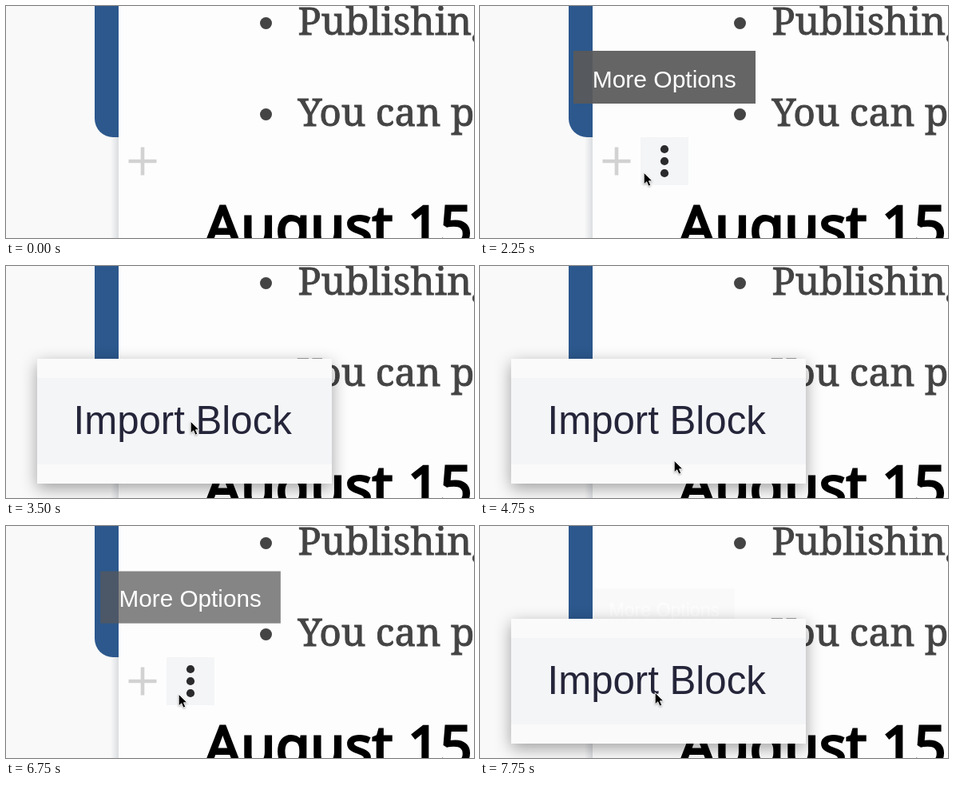
An HTML page for the animation above (8 s loop, 586 by 290 pixels).

```html
<!DOCTYPE html>
<html lang="en">
<head>
<meta charset="utf-8">
<title>Block menu</title>
<style>
  html, body { margin: 0; width: 100%; height: 100%; overflow: hidden; background: #f9f9f9; }
  svg { display: block; width: 100%; height: 100%; }

  /* Thin strokes give the in-between weights */
  .serif { font: 48px "Noto Serif", serif; fill: #444; stroke: #444; stroke-width: .9px; }
  .head { font: 70px "Noto Sans", "Open Sans", sans-serif; letter-spacing: .4px; stroke: #000; stroke-width: 3px; }
  .tip text { font: 30px "Liberation Sans", Arial, sans-serif; fill: #fff; text-anchor: middle; }
  .menu text { font: 49.2px "Liberation Sans", Arial, sans-serif; fill: #25253a; }
  .panel { fill: #fafafb; filter: drop-shadow(0 6px 10px rgba(0, 0, 0, .36)); }
  .arrow { filter: drop-shadow(0 1px .8px rgba(0, 0, 0, .3)); }

  /* Everything advances in 250 ms steps: 3.125% of the loop each */
  .cursor, .dots, .hover, .tip, .menu, .row {
    animation: 8s step-end infinite;
    transform-origin: 0 0;
  }
  .tip { transform-origin: 231px 89px; }
  .cursor { animation-name: cursor; }
  .dots { animation-name: dots; }
  .hover { animation-name: hover; }
  .tip { animation-name: tip; }
  .menu { animation-name: menu; }
  .row { animation-name: row; }

  @keyframes cursor {
    0% { opacity: 0; transform: translate(250px, 262px); }
    18.75% { opacity: 1; transform: translate(250px, 262px); }
    21.875% { opacity: 1; transform: translate(213px, 236px); }
    25% { opacity: 1; transform: translate(205px, 215px); }
    28.125% { opacity: 1; transform: translate(205px, 208px); }
    31.25% { opacity: 1; transform: translate(220px, 201px); }
    34.375% { opacity: 1; transform: translate(226px, 192px); }
    37.5% { opacity: 1; transform: translate(231px, 194px); }
    59.375% { opacity: 1; transform: translate(243px, 243px); }
    62.5% { opacity: 1; transform: translate(421px, 206px); }
    65.625% { opacity: 1; transform: translate(477px, 204px); }
    68.75% { opacity: 1; transform: translate(483px, 205px); }
    75% { opacity: 1; transform: translate(472px, 208px); }
    78.125% { opacity: 1; transform: translate(308px, 228px); }
    81.25% { opacity: 1; transform: translate(226px, 215px); }
    84.375% { opacity: 1; transform: translate(216px, 210px); }
    93.75%, 100% { opacity: 1; transform: translate(219px, 208px); }
  }
  @keyframes dots {
    0%, 43.75%, 96.875%, 100% { opacity: 0; }
    25%, 81.25% { opacity: 1; }
    40.625%, 93.75% { opacity: .7; }
  }
  @keyframes hover {
    0%, 43.75%, 96.875%, 100% { opacity: 0; }
    28.125%, 84.375% { opacity: 1; }
    40.625%, 93.75% { opacity: .4; }
  }
  @keyframes tip {
    0%, 43.75% { opacity: 0; transform: none; }
    28.125%, 87.5% { opacity: 1; transform: none; }
    40.625%, 93.75% { opacity: .88; transform: none; }
    84.375% { opacity: .79; transform: scale(.99); }
    96.875%, 100% { opacity: .02; transform: translateY(14px) scale(.77); }
  }
  @keyframes menu {
    0%, 71.875% { opacity: 0; transform: none; }
    40.625%, 93.75% { opacity: .16; transform: translate(43.5px, 58.2px) scale(.833, .705); }
    43.75%, 96.875%, 100% { opacity: 1; transform: none; }
    68.75% { opacity: .15; transform: none; }
  }
  @keyframes row {
    0%, 62.5% { opacity: 0; }
    43.75%, 96.875%, 100% { opacity: 1; }
  }
</style>
</head>
<body>
<svg viewBox="0 0 586 290">
  <defs>
    <linearGradient id="edge">
      <stop offset="0" stop-color="#dadde1" stop-opacity="0"/>
      <stop offset="1" stop-color="#dadde1"/>
    </linearGradient>
  </defs>

  <rect width="586" height="290" fill="#f9f9f9"/>
  <rect x="131" width="10" height="290" fill="url(#edge)"/>
  <path d="M111 0H141V164H134A23 23 0 0 1 111 141Z" fill="#2c588d"/>
  <rect x="141" width="445" height="290" fill="#fdfdfd"/>

  <g fill="#444">
    <circle cx="325.5" cy="21.5" r="7.5"/>
    <circle cx="325.5" cy="135.5" r="7.5"/>
  </g>
  <text class="serif" x="365.5" y="36">Publishing</text>
  <text class="serif" x="365.5" y="150">You can publish</text>
  <text class="head" x="249" y="300">August 15</text>

  <path d="M153.5 194H188.5M171 176.5V211.5" stroke="#d2d2d2" stroke-width="4.6"/>
  <rect class="hover" x="201" y="164" width="60" height="60" fill="#f4f5f7"/>
  <g class="dots" fill="#2b2b2e">
    <circle cx="231" cy="179" r="5.1"/>
    <circle cx="231" cy="194" r="5.1"/>
    <circle cx="231" cy="209" r="5.1"/>
  </g>

  <g class="tip">
    <rect x="117" y="56" width="228" height="66" fill="#5a5a5a" fill-opacity=".93"/>
    <text x="230.7" y="101.5">More Options</text>
  </g>

  <g class="menu">
    <rect class="panel" x="39" y="116" width="369" height="156"/>
    <rect class="row" x="39" y="140" width="369" height="108" fill="#f4f5f7"/>
    <text x="84.5" y="209.5">Import Block</text>
  </g>

  <g class="cursor">
    <path class="arrow" d="M.2 .2V15L3.7 11.8L6 17.2L8.8 16L6.5 10.8H10.9Z" fill="#000" stroke="#fff" stroke-width=".9"/>
  </g>
</svg>
</body>
</html>
```
